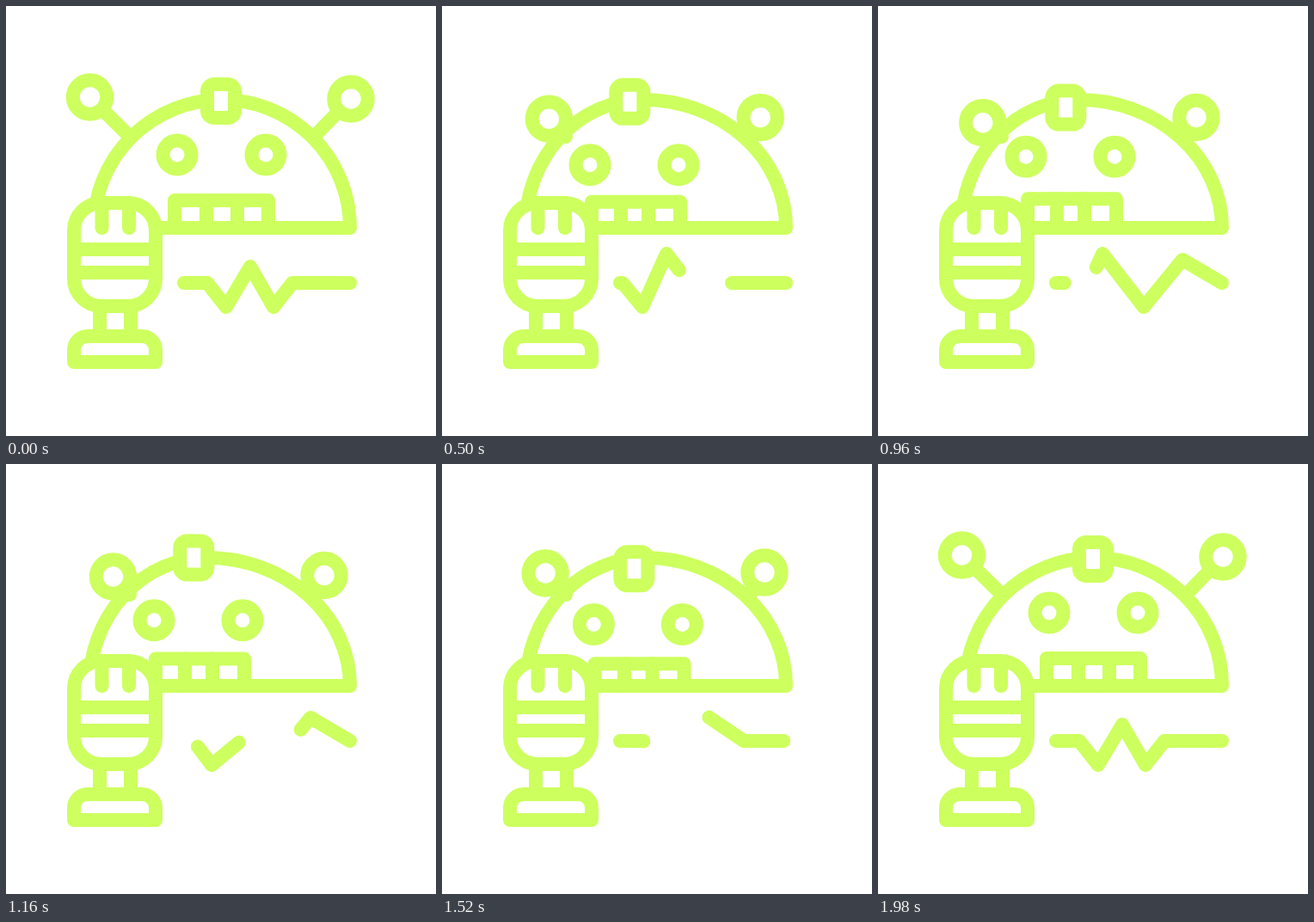
These frames come from a looping animation (500 px wide and 500 px high, 2000 ms). An HTML page with a canvas:

```html
<!DOCTYPE html>
<html lang="en">
<head>
<meta charset="utf-8">
<title>Robot podcast</title>
<style>
html, body { margin: 0; width: 100%; height: 100%; overflow: hidden; background: #fff; }
canvas { display: block; width: 500px; height: 500px; }
</style>
</head>
<body>
<canvas id="stage" width="500" height="500"></canvas>
<script>
const ctx = document.getElementById("stage").getContext("2d");
const LOOP = 2000;
const INK = "#cdff5e";

const WAVE_A = [[207, 322], [234, 322], [256, 350], [284, 303], [311, 350], [333, 322], [400, 322]];
const WAVE_B = [[207, 322], [210, 322], [233, 350], [261, 288], [309, 350], [354, 295], [400, 322]];
const WAVE_C = [[207, 322], [218, 322], [239, 350], [308, 293], [351, 322], [400, 322]];

const ramp = (t, start, len) => Math.min(1, Math.max(0, (t - start) / len));
const ease = (t, start, len) => (1 - Math.cos(Math.PI * ramp(t, start, len))) / 2;
const bump = (t, start, end) => Math.sin(Math.PI * ramp(t, start, end - start)) ** 2;

function line(...pts) {
  ctx.beginPath();
  pts.forEach(([x, y]) => ctx.lineTo(x, y));
  ctx.stroke();
}

function ring(x, y, r) {
  ctx.beginPath();
  ctx.arc(x, y, r, 0, Math.PI * 2);
  ctx.fill();
  ctx.stroke();
}

function box(x, y, w, h, r) {
  ctx.beginPath();
  ctx.roundRect(x, y, w, h, r);
  ctx.fill();
  ctx.stroke();
}

// Strokes the part of a polyline between two fractions of its length.
function trim(pts, from, to) {
  if (to <= from) return;
  const lens = pts.slice(1).map((p, i) => Math.hypot(p[0] - pts[i][0], p[1] - pts[i][1]));
  const total = lens.reduce((a, b) => a + b, 0);
  const a = from * total, b = to * total;
  let pos = 0;
  const part = [];
  lens.forEach((len, i) => {
    const lo = Math.max(a, pos), hi = Math.min(b, pos + len);
    if (hi > lo) {
      const at = d => [0, 1].map(k => pts[i][k] + (pts[i + 1][k] - pts[i][k]) * (d - pos) / len);
      if (!part.length) part.push(at(lo));
      part.push(at(hi));
    }
    pos += len;
  });
  if (part.length) line(...part);
}

function drawAntennas(t, turn) {
  const left = bump(t, 480, 1080), right = bump(t, 480, 960);
  const lx = 97.5 + 27 * turn - 8 * left, ly = 106 + 25 * turn + 14 * left;
  const rx = 401 - 31 * turn + 8 * right, ry = 108 + 21.5 * turn + 9.5 * right;
  line([lx, ly], [144, 152]);
  line([rx, ry], [358, 152]);
  ring(lx, ly, 19.7);
  ring(rx, ry, 19.7);
}

// The crown slides left as the head turns, so each side is its own quarter ellipse.
function drawDome(turn) {
  const left = 102 - 5 * turn, top = 251 - 17 * turn, right = 400;
  ctx.beginPath();
  ctx.ellipse(top, 258, top - left, 149, 0, Math.PI, Math.PI * 1.5);
  ctx.ellipse(top, 258, right - top, 149, 0, Math.PI * 1.5, Math.PI * 2);
  ctx.lineTo(174, 258);
  ctx.stroke();
}

function drawFace(t, turn, dip) {
  const eyeY = 173 + 15 * dip - 10 * bump(t, 0, 620) - 13 * bump(t, 640, 1330);
  const eyeX = 199 - 27 * turn;
  ring(eyeX, eyeY, 16.5);
  ring(eyeX + 103, eyeY, 16.5);

  const top = 226 + 7 * dip - 9.7 * (bump(t, 0, 680) + bump(t, 700, 1360));
  const x0 = 196 - 22 * turn, x3 = 305 - 28 * turn;
  line([x0, 258], [x0, top], [x3, top], [x3, 258]);
  for (const x of [233 - 25 * turn, 269 - 29 * turn]) line([x, top], [x, 258]);
}

function drawHead(t) {
  const turn = ease(t, 0, 510) - ease(t, 1390, 500);
  const dip = ease(t, 0, 510) - ease(t, 1420, 500);
  const lift = 15 * (bump(t, 120, 700) + bump(t, 860, 1380));
  drawAntennas(t, turn);
  drawDome(turn);
  drawFace(t, turn, dip);
  box(234 - 31.7 * turn, 91 + 12.5 * dip - lift, 32, 39, 8);
}

function drawMic() {
  for (const x of [109, 145]) line([x, 349], [x, 384]);
  box(79, 229, 95, 120, 32);
  for (const x of [111.5, 143]) line([x, 229], [x, 258]);
  for (const y of [283, 310]) line([79, y], [174, y]);
  box(79, 384, 95, 30, [16, 16, 0, 0]);
}

function drawWave(t) {
  trim(WAVE_A, ease(t, 10, 720), 1);
  trim(WAVE_B, ease(t, 735, 625), ramp(t, 200, 710));
  trim(WAVE_C, ramp(t, 1103, 714), ease(t, 870, 700));
  trim(WAVE_A, 0, ease(t, 1405, 565));
}

const begin = performance.now();

function frame() {
  const t = (performance.now() - begin) % LOOP;
  ctx.fillStyle = "#fff";
  ctx.fillRect(0, 0, 500, 500);
  ctx.strokeStyle = INK;
  ctx.lineWidth = 16;
  ctx.lineCap = ctx.lineJoin = "round";
  drawHead(t);
  drawMic();
  drawWave(t);
  requestAnimationFrame(frame);
}

frame();
</script>
</body>
</html>
```
